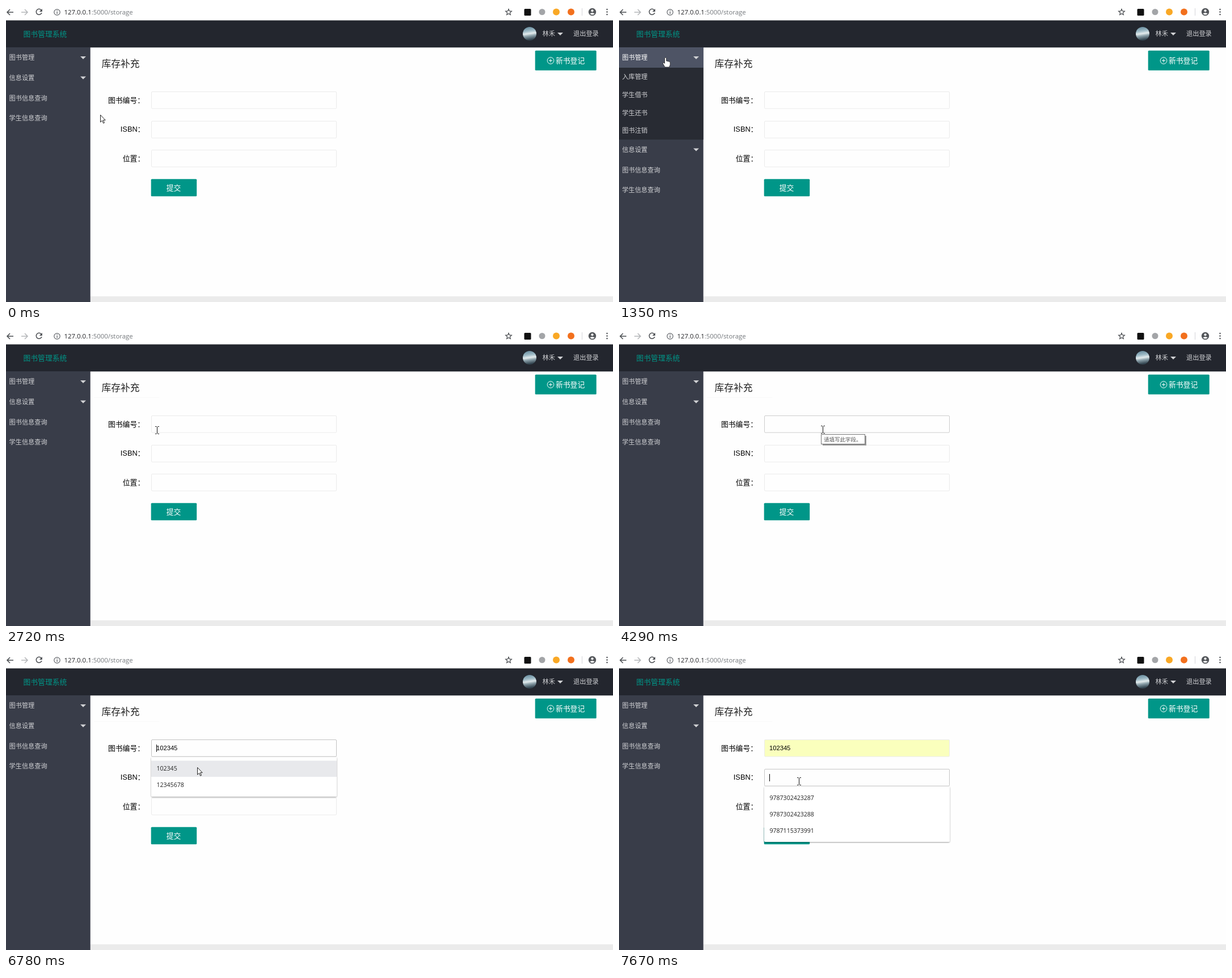
Recreate the animation shown at these times as an HTML page. Size 1070 by 523 pixels, loop 8 s.

```html
<!DOCTYPE html>
<html lang="zh-CN">
<head>
<meta charset="utf-8">
<title>库存补充</title>
<style>
  html, body { margin: 0; width: 100%; height: 100%; overflow: hidden; background: #fefefe; }
  svg { display: block; width: 1070px; height: 523px; }
  text { font-family: "Liberation Sans", "Noto Sans CJK SC", "Noto Sans CJK", sans-serif; white-space: pre; }
  .ui { font-family: "Open Sans", "Noto Sans", sans-serif; }
  .cjk { font-family: "Noto Sans CJK SC", "Noto Sans CJK", sans-serif; }
</style>
</head>
<body>
<svg id="stage" viewBox="0 0 1070 523" xmlns="http://www.w3.org/2000/svg"></svg>
<script>
const LOOP = 8000;
const DIM = '#d0d1d4', TEAL = '#009688';

// Bursts of screen updates: first change, last change, number of changes
const BURSTS = [
  [250, 730, 9], [1350, 2060, 13], [2310, 3060, 13], [3120, 3420, 6], [4290, 4400, 3],
  [4820, 4880, 2], [5370, 5370, 1], [5860, 5860, 1], [6420, 6420, 1],
  [6670, 7020, 6], [7200, 7390, 4], [7550, 7670, 2]
];

// Pointer path: time, x, y
const PATH = [
  [0, 166, 192], [200, 166, 192], [400, 134, 158], [560, 95, 112], [680, 83, 93], [730, 82, 91],
  [1580, 82, 91], [1800, 64, 106], [2000, 43, 126], [2060, 41, 128],
  [2400, 41, 128], [2520, 110, 150], [2620, 220, 173], [2680, 266, 177], [2720, 266, 177],
  [2900, 318, 178], [3060, 342, 177], [3180, 359, 177], [4230, 359, 177], [4290, 359, 176], [4400, 359, 172],
  [6610, 359, 172], [6740, 337, 200], [7020, 335, 206], [7200, 335, 206], [7390, 317, 225], [LOOP, 317, 225]
];

const between = (t, a, b) => t >= a && t < b;
const ramp = (t, a, b) => Math.max(0, Math.min(1, (t - a) / (b - a)));
const mix = (a, b, k) => `rgb(${a.map((v, i) => Math.round(v + (b[i] - v) * k))})`;

function snap(t) {
  let last = 0;
  for (const [a, b, n] of BURSTS) {
    if (t < a) break;
    const step = n > 1 ? (b - a) / (n - 1) : 1;
    last = Math.min(b, a + Math.floor((t - a) / step + 1e-6) * step);
  }
  return last;
}

function pointer(t) {
  const i = PATH.findIndex(p => p[0] > t);
  const [t0, x0, y0] = PATH[i - 1], [t1, x1, y1] = PATH[i];
  const k = (t - t0) / (t1 - t0);
  return [Math.round(x0 + (x1 - x0) * k), Math.round(y0 + (y1 - y0) * k)];
}

// Markup helpers; text is placed by its left edge and its vertical centre
const text = (x, cy, size, str, fill, extra = '') =>
  `<text x="${x}" y="${(cy + size * .37).toFixed(2)}" font-size="${size}" fill="${fill}" ${extra}>${str}</text>`;
const rect = (x, y, w, h, fill, extra = '') =>
  `<rect x="${x}" y="${y}" width="${w}" height="${h}" fill="${fill}" ${extra}/>`;
const path = (d, extra) => `<path d="${d}" ${extra}/>`;
const disc = (x, y, r, fill, extra = '') => `<circle cx="${x}" cy="${y}" r="${r}" fill="${fill}" ${extra}/>`;
const line = (d, color, w = 1.6) => path(d, `fill="none" stroke="${color}" stroke-width="${w}"`);
const field = (id, y) => rect(256.5, y + .5, 326, 29.7, '#fefefe', `id="${id}" rx="1.5" stroke="#ebebeb"`);

function star(cx, cy, r) {
  const pts = Array.from({ length: 10 }, (_, i) => {
    const a = -Math.PI / 2 + i * Math.PI / 5, q = i % 2 ? r * .45 : r;
    return `${(cx + q * Math.cos(a)).toFixed(2)} ${(cy + q * Math.sin(a)).toFixed(2)}`;
  });
  return `M${pts.join('L')}Z`;
}

function dropdown(id, y, h, rows, active) {
  return `<g id="${id}">` + rect(256, y, 327, h, '#fff', 'rx="2" filter="url(#shade)"') +
    (active ? rect(256, y + 6.5, 327, 28.5, '#e8e9ec') : '') +
    rows.map((s, i) => text(265.5, y + 20.5 + i * 28.6, 10.55, s, '#222', 'class="ui"')).join('') + '</g>';
}

const browserBar =
  rect(0, 0, 1070, 26, '#fff') +
  line('M13 11H2.5M7 6L2 11L7 16', '#4a4d51', 1.5) +
  line('M27 11H37.500M33 6L38 11L33 16', '#b4b6b9', 1.5) +
  `<g id="reload">` + line('M62.300 7.300A5 5 0 1 0 63 12', '#4a4d51', 1.5) + path('M63.800 5V10H58.800Z', 'fill="#4a4d51"') + '</g>' +
  `<g id="stop">` + line('M53.500 6.500L62.500 15.500M62.500 6.500L53.500 15.500', '#4a4d51', 1.5) + '</g>' +
  disc(90, 11, 5.2, 'none', 'stroke="#5f6368" stroke-width="1.2"') +
  rect(89.4, 10, 1.3, 4, '#5f6368') + rect(89.4, 7.6, 1.3, 1.4, '#5f6368') +
  text(102.5, 10.5, 11.4, '127.0.0.1<tspan fill="#73777b">:5000/storage</tspan>', '#202124', 'class="ui"') +
  path(star(886, 11, 5.6), 'fill="none" stroke="#4a4d51" stroke-width="1.2"') +
  rect(913.5, 5, 12, 12, '#111', 'rx="1.5"') +
  disc(945, 10.5, 5.5, '#a3a5a8') + disc(970, 10.5, 6, '#f9a825') + disc(996, 10.5, 6, '#f2701d') +
  rect(1015, 4, 1, 13, '#d4d6d9') +
  disc(1033.5, 10.5, 6.7, '#54575b') + disc(1033.5, 8.3, 2.1, '#fff') +
  path('M1029.300 13.600Q1033.500 10.400 1037.700 13.600Q1033.500 17.500 1029.300 13.600Z', 'fill="#fff"') +
  [6, 10.5, 15].map(y => disc(1059.5, y, 1.3, '#54575b')).join('');

const header =
  rect(0, 25.4, 1070, 47.9, '#23262e') +
  text(30.5, 49, 12.8, '图书管理系统', TEAL) +
  disc(923, 49, 12, 'url(#sky)') +
  text(945.5, 49, 11.2, '林禾', DIM) +
  path('M972 47H982L977 52Z', `fill="${DIM}"`) +
  text(1000, 49, 11.2, '退出登录', DIM);

const MAIN = ['图书管理', '信息设置', '图书信息查询', '学生信息查询'];
const SUB = ['入库管理', '学生借书', '学生还书', '图书注销'];
const BAR = 148.7;
const sidebar =
  rect(0, 73, BAR, 450, '#393d49') +
  rect(0, 73, BAR, 36, '#4e5465', 'id="glow"') +
  '<g id="sub">' + rect(0, 109, BAR, 127, '#282b33') +
  SUB.map((s, i) => text(5.5, 125 + i * 31.7, 11.2, s, DIM, `id="sub${i}"`)).join('') + '</g>' +
  text(5.5, 91, 11.2, MAIN[0], DIM, 'id="main0"') +
  path('', 'id="caret0"') +
  '<g id="rest">' +
  MAIN.slice(1).map((s, i) => text(5.5, 126.7 + i * 35.7, 11.2, s, DIM, `id="main${i + 1}"`)).join('') +
  path('M131 124.500H141L136 129.500Z', `fill="${DIM}"`) + '</g>';

const content =
  rect(149, 513, 921, 10, '#ebebeb') +
  text(168.5, 102, 16.8, '库存补充', '#222') +
  rect(155, 119, 115, 1, '#f9f9f9', 'id="rule"') +
  rect(932.7, 78.7, 108, 35.1, TEAL, 'rx="1.5"') +
  disc(960, 96.5, 5.8, 'none', 'stroke="#fff"') + line('M957 96.500H963M960 93.500V99.500', '#fff', 1) +
  text(969, 96.5, 12.8, '新书登记', '#fff') +
  text(180, 166, 12.8, '图书编号：', '#000', 'class="cjk"') +
  text(201.8, 217.3, 12.8, 'ISBN<tspan class="cjk" x="231.500">：</tspan>', '#000') +
  text(205.8, 269, 12.8, '位置：', '#000', 'class="cjk"') +
  field('code', 151) + field('isbn', 203) + field('place', 254) +
  text(265, 166, 11.2, '102345', '#000', 'id="value"') +
  rect(255.7, 305.7, 80.5, 30.6, TEAL, 'rx="1.5"') +
  text(282.8, 321, 12.8, '提交', '#fff') +
  rect(265, 160, 1, 13, '#000', 'id="caret"');

const overlays =
  dropdown('codes', 182, 70, ['102345', '12345678'], true) +
  dropdown('isbns', 234, 98, ['9787302423287', '9787302423288', '9787115373991']) +
  '<g id="tip">' + rect(359, 187, 77, 17, '#000', 'opacity=".4"') +
  rect(356.5, 184.5, 77, 17, '#fff', 'stroke="#767676"') +
  text(361, 193.3, 9.5, '请填写此字段。', '#575757', 'class="cjk"') + '</g>' +
  '<g id="pointer">' +
  path('M.5.500V13.200L3.500 10.400L5.600 15.200L7.500 14.300L5.400 9.700H9.200Z',
    'id="arrow" fill="#fff" stroke="#222" stroke-linejoin="round"') +
  path('M-1.500 1Q0 -1.200 1.500 1V6L7 7.300Q8.500 8 8.200 10V13L6.500 17H-1L-4.500 11Q-5 8.500 -3 9L-1.500 10.500Z',
    'id="hand" fill="#fff" stroke="#222" stroke-width=".8"') +
  path('M-3 -6.500H-.5M1.500 -6.500H4M-3 6.500H-.5M1.500 6.500H4M.5 -6V6',
    'id="beam" fill="none" stroke="#222" stroke-width="1.1"') + '</g>';

const stage = document.getElementById('stage');
stage.innerHTML =
  `<defs>
    <linearGradient id="sky" x1="0" y1="0" x2=".15" y2="1">
      <stop offset="0" stop-color="#5f8497"/><stop offset=".35" stop-color="#9dbac6"/>
      <stop offset=".55" stop-color="#e4ecee"/><stop offset=".72" stop-color="#8ba0a9"/>
      <stop offset="1" stop-color="#334550"/>
    </linearGradient>
    <filter id="shade" x="-5%" y="-10%" width="110%" height="125%">
      <feDropShadow dx="0" dy="1" stdDeviation="1.3" flood-color="#000" flood-opacity=".4"/>
    </filter>
  </defs>` + browserBar + header + sidebar + content + overlays;

const el = {};
stage.querySelectorAll('[id]').forEach(e => el[e.id] = e);
const set = (id, name, value) => el[id].setAttribute(name, value);
const show = (id, on) => set(id, 'opacity', Number(on));

function draw(now) {
  const t = snap(now);
  const [x, y] = pointer(t);

  // Sidebar
  const open = between(t, 1350, 2560), flipped = between(t, 1440, 2560);
  const shift = open ? 127 : 0;
  const inside = x < 149 && y >= 73;
  show('sub', open);
  set('rest', 'transform', `translate(0 ${shift})`);
  show('glow', ramp(t, 430, 730) * (1 - ramp(t, 1760, 2000)));
  MAIN.forEach((_, i) => {
    const top = 73 + i * 35.7 + (i ? shift : 0);
    const on = inside && between(y, top, top + 35.7) || (i === 0 && open);
    set('main' + i, 'fill', on ? '#fff' : DIM);
  });
  SUB.forEach((_, i) => {
    const top = 109 + i * 31.7;
    set('sub' + i, 'fill', inside && between(y, top, top + 31.7) ? '#fff' : DIM);
  });
  set('caret0', 'd', flipped ? 'M131 94H141L136 89Z' : 'M131 89H141L136 94Z');
  set('caret0', 'fill', flipped ? '#fff' : DIM);

  // Page reload
  const loading = between(t, 2370, 2620);
  show('reload', !loading);
  show('stop', loading);
  show('rule', t >= 2560);

  // Form
  const grey = (a, b, k) => mix([a, a, a], [b, b, b], k);
  const hot = ramp(t, 2720, 3000) * (t < 7550);
  set('code', 'stroke', between(t, 4820, 7550) ? '#c2c2c2' : grey(235, 205, hot));
  set('code', 'fill', mix([254, 254, 254], [250, 255, 189], ramp(t, 6745, 7020)));
  set('isbn', 'stroke', grey(235, 198, ramp(t, 7250, 7600)));
  show('value', t >= 6730);
  show('caret', between(t, 4820, 5370) || between(t, 5860, 6420) || t >= 6730);
  set('caret', 'x', between(t, 7200, 7550) ? 302 : 265);
  set('caret', 'y', t >= 7550 ? 212 : 160);

  // Popups
  const codes = between(t, 4850, 7200);
  show('codes', codes);
  show('isbns', t >= 7600);
  show('tip', ramp(t, 3200, 3420) * (t < 4820));

  // Pointer shape follows what lies under it
  const overField = x >= 256 && x < 583 && (between(y, 151, 182) || between(y, 203, 234));
  const shape = inside ? 'hand' : overField && !(codes && y > 182) ? 'beam' : 'arrow';
  ['arrow', 'hand', 'beam'].forEach(id => show(id, id === shape));
  set('pointer', 'transform', `translate(${x} ${y})`);
}

const start = performance.now();
function tick() {
  draw((performance.now() - start) % LOOP);
  requestAnimationFrame(tick);
}
tick();
</script>
</body>
</html>
```
